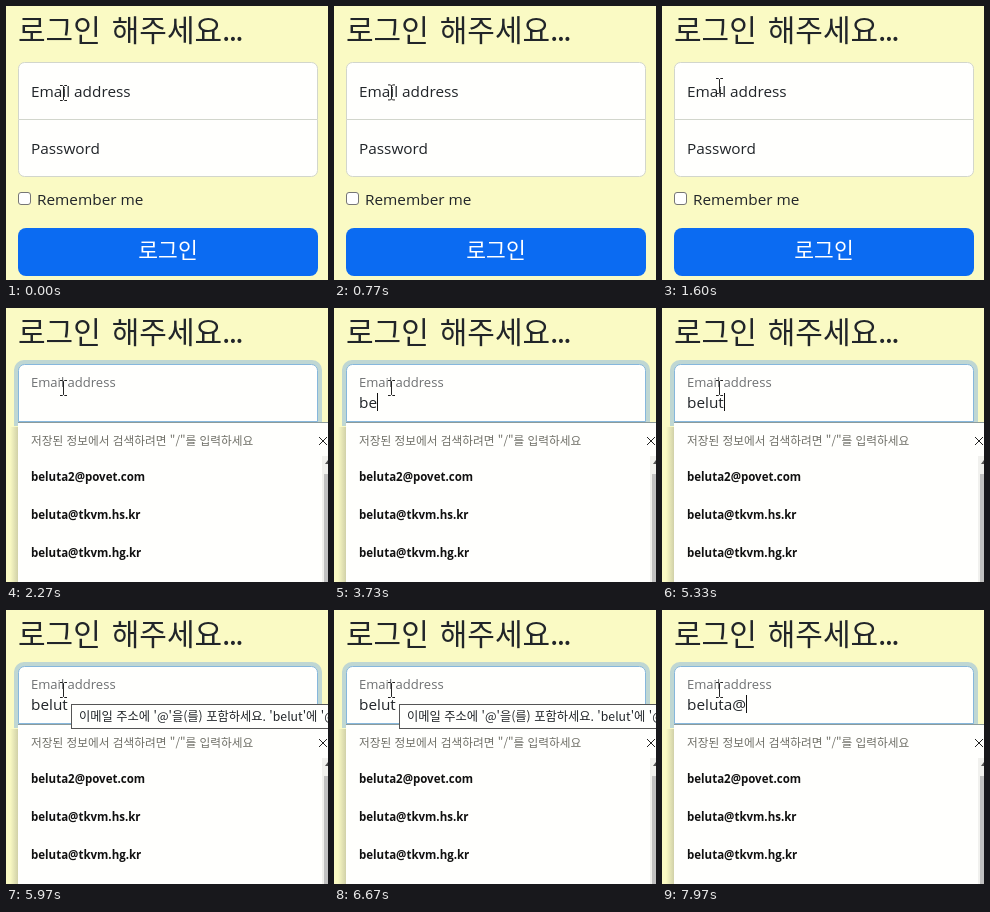
An HTML page that plays this animation: 322 px wide and 274 px high, repeating every 8000 ms.

```html
<!DOCTYPE html>
<html lang="ko">
<head>
<meta charset="utf-8">
<title>로그인</title>
<style>
  html, body { margin: 0; width: 100%; height: 100%; overflow: hidden; background: #fafac4; }
  svg { display: block; width: 100vw; height: 100vh; }
  text { fill: #212529; white-space: pre; }
  .latin { font: 15.35px "Open Sans", "Noto Sans", sans-serif; }
  .ko { font-family: "Noto Sans CJK KR", "Noto Sans CJK", sans-serif; }
  .light { font-weight: 300; }
  .bold { font: 700 11.5px "Open Sans", "Noto Sans", sans-serif; fill: #111; }
  .line { fill: none; stroke: #222; stroke-width: 1; }
</style>
</head>
<body>
<svg viewBox="0 0 322 274">
  <defs>
    <linearGradient id="edge">
      <stop offset="0" stop-color="#555" stop-opacity="0"/>
      <stop offset="1" stop-color="#555" stop-opacity=".25"/>
    </linearGradient>
  </defs>
  <rect width="322" height="274" fill="#fafac4"/>
  <text class="ko light" x="12" y="35" font-size="30" word-spacing="2.5">로그인 해주세요<tspan letter-spacing="-1.8">...</tspan></text>

  <path d="M12.5 113.5h299v51a6 6 0 0 1-6 6h-287a6 6 0 0 1-6-6z" fill="#fffffd" stroke="#d2d6cc"/>
  <text class="latin" x="25" y="148">Password</text>
  <rect x="12.5" y="186.5" width="12" height="12" rx="2.5" fill="#fff" stroke="#767676"/>
  <text class="latin" x="31" y="199">Remember me</text>
  <rect x="12" y="222" width="300" height="48" rx="8" fill="#0b6bf2"/>
  <text class="ko" x="162" y="252" font-size="21.5" text-anchor="middle" style="fill:#fff">로그인</text>

  <path id="ring" d="M8 118V62a10 10 0 0 1 10-10h288a10 10 0 0 1 10 10v56z" fill="#0d6efd"/>
  <path id="field" d="M12.5 113.5v-51a6 6 0 0 1 6-6h287a6 6 0 0 1 6 6v51z" fill="#fffffd"/>
  <text id="label" class="latin">Email address</text>
  <text id="value" class="latin" x="25" y="100"></text>
  <rect id="caret" y="85" width="1" height="18" fill="#111"/>

  <g id="popup">
    <rect x="4" y="119" width="8" height="155" fill="url(#edge)"/>
    <rect x="12" y="114" width="310" height="1" fill="#8c9c9c"/>
    <rect x="12" y="115" width="310" height="159" fill="#fffffd"/>
    <text class="ko" x="25" y="137" font-size="11.7" style="fill:#707068">저장된 정보에서 검색하려면 "/"를 입력하세요</text>
    <path class="line" d="M313 129l8 8m0-8l-8 8"/>
    <rect x="316" y="148" width="6" height="126" fill="#f1f1ee"/>
    <path d="M319 156l3-4v4z" fill="#555"/>
    <rect x="318" y="166" width="4" height="108" fill="#c1c1c1"/>
    <text class="bold" x="25" y="173">beluta2@povet.com</text>
    <text class="bold" x="25" y="211">beluta@tkvm.hs.kr</text>
    <text class="bold" x="25" y="249">beluta@tkvm.hg.kr</text>
  </g>

  <g id="tip">
    <rect x="65.5" y="94.5" width="270" height="24" fill="#fffffd" stroke="#555"/>
    <text class="ko" x="73" y="111" font-size="12.25">이메일 주소에 '@'을(를) 포함하세요. 'belut'에 '@'이(가) 없습니다.</text>
  </g>

  <path id="pointer" class="line" d="M-3.5-7.5h2.5l1 1 1-1h2.5M0-6.5v13M-3.5 7.5h2.5l1-1 1 1h2.5"/>
</svg>
<script>
  const LOOP = 8000, FOCUS = 1680, BLINK = 530;
  const TYPED = "beluta@";
  const KEYS = [3200, 3480, 3950, 4200, 4450, 6950, 7500];
  const $ = id => document.getElementById(id);
  const [ring, field, label, value, caret, popup, tip, pointer] =
    ["ring", "field", "label", "value", "caret", "popup", "tip", "pointer"].map($);

  const clamp = x => Math.min(1, Math.max(0, x));
  const ease = x => x * x * (3 - 2 * x);
  const part = (t, start, length) => ease(clamp((t - start) / length));
  const mix = (a, b, k) => a + (b - a) * k;
  const show = (el, on) => el.setAttribute("visibility", on ? "visible" : "hidden");

  function caretOn(t) {
    if (t < FOCUS) return false;
    // The caret stays lit for a while after the fifth letter.
    if (t >= KEYS[4] && t < 5460) return true;
    const start = [FOCUS, ...KEYS, 5460 - BLINK].filter(k => k <= t).sort((a, b) => b - a)[0];
    return Math.floor((t - start) / BLINK) % 2 === 0;
  }

  function draw(t) {
    const glow = part(t, FOCUS, 150), lift = part(t, FOCUS, 100);
    ring.setAttribute("opacity", 0.25 * glow);
    field.setAttribute("stroke", `rgb(${mix(210, 134, glow)},${mix(214, 183, glow)},${mix(204, 220, glow)})`);
    label.setAttribute("transform", `translate(25 ${mix(91, 79, lift)}) scale(${mix(1, 0.85, lift)})`);
    label.setAttribute("opacity", mix(1, 0.65, lift));
    value.textContent = TYPED.slice(0, KEYS.filter(k => k <= t).length);
    caret.setAttribute("x", 25 + Math.round(value.getComputedTextLength()));
    show(caret, caretOn(t));
    show(popup, t >= FOCUS + 70);
    show(tip, t >= 5900 && t < KEYS[5]);
    pointer.setAttribute("transform", `translate(57.5 ${mix(87, 80, part(t, 700, 400))})`);
  }

  const begin = performance.now();
  function tick() {
    draw((performance.now() - begin) % LOOP);
    requestAnimationFrame(tick);
  }
  tick();
</script>
</body>
</html>
```
